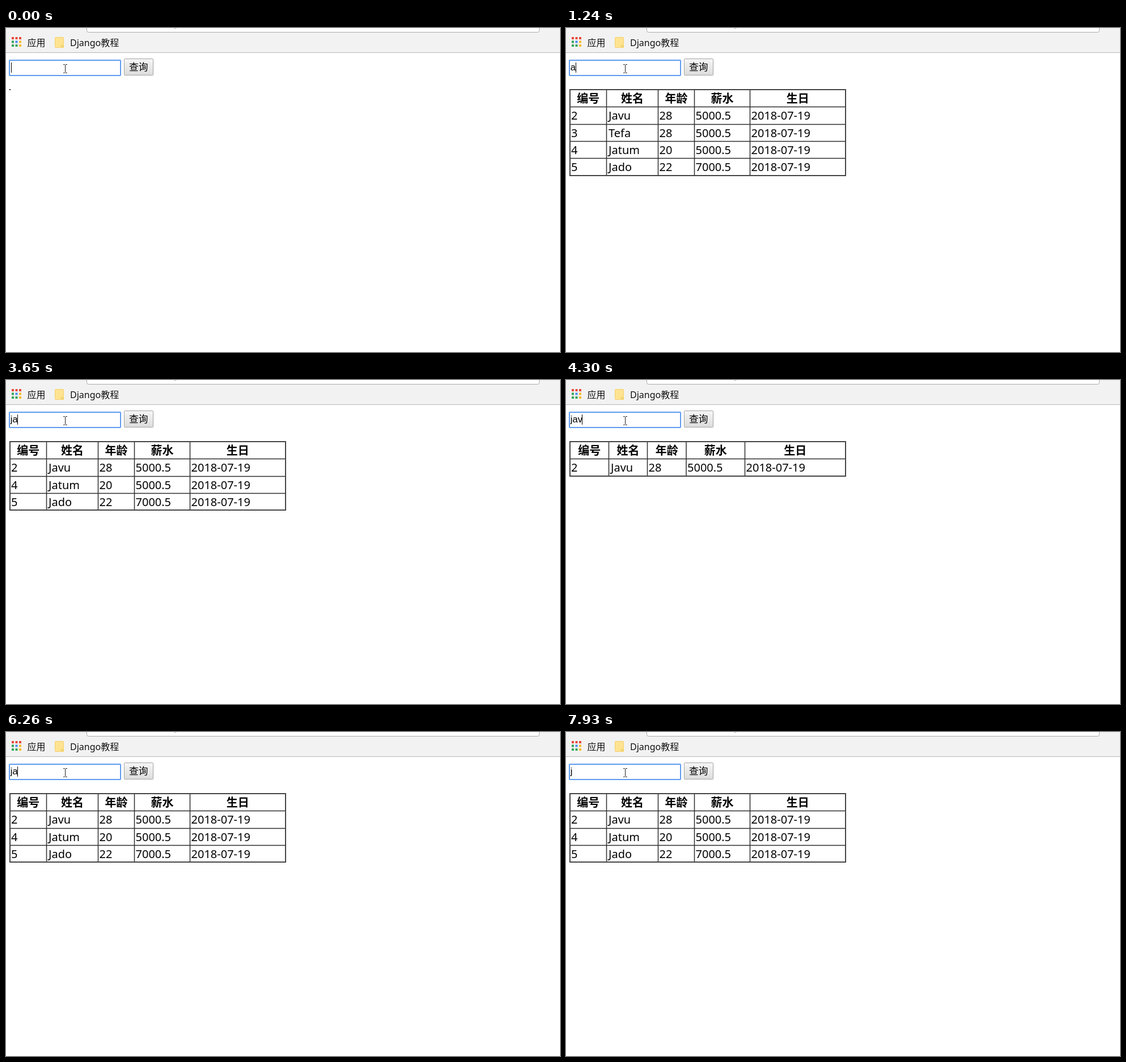
Animation, 977 px wide and 573 px high, one loop 8 s. Source, as an HTML page:

```html
<!DOCTYPE html>
<html lang="zh-CN">
<head>
<meta charset="utf-8">
<title>Django教程</title>
<style>
html, body { margin: 0; width: 100%; height: 100%; overflow: hidden; background: #fff; }
svg { display: block; width: 977px; height: 573px; }
text { font-family: "Noto Sans", "Noto Sans CJK SC", "Noto Sans CJK", sans-serif; fill: #000; white-space: pre; }
.bar { font-size: 16px; fill: #111; }
.btn { font-size: 16.67px; }
.typed { font: 16.67px "Liberation Sans", Arial, sans-serif; }
.cell { font-size: 20px; }
.head { font-size: 20px; font-weight: 700; text-anchor: middle; }
</style>
</head>
<body>
<svg viewBox="0 0 977 573">
  <defs>
    <linearGradient id="face" x2="0" y2="1">
      <stop stop-color="#f6f6f6"/><stop offset="1" stop-color="#dcdcdc"/>
    </linearGradient>
  </defs>

  <!-- browser bar -->
  <rect width="977" height="43" fill="#f2f2f2"/>
  <rect y="43" width="977" height="1" fill="#b6b6b6"/>
  <rect x="142.5" y="-20" width="798" height="27.5" rx="3" fill="#fff" stroke="#a9a9a9"/>
  <path d="M296.500 0h4" stroke="#777"/>
  <g id="apps"></g>
  <text class="bar" x="37.500" y="32">应用</text>
  <path d="M87.500 16.500h13q1 0 1 1v12.500l-3 4.500h-11q-1 0-1-1v-16q0-1 1-1z" fill="#fee391" stroke="#f3d06c"/>
  <path d="M97 35v-5h5v4q0 1-1 1z" fill="#f5d36b"/>
  <text class="bar" x="113" y="32">Django教程</text>

  <!-- search form -->
  <rect x="6" y="57" width="196" height="27" rx="1" fill="#fff" stroke="#5e9bee" stroke-width="2"/>
  <text class="typed" id="typed" x="7.700" y="75"></text>
  <rect id="caret" y="61" width="1" height="18"/>
  <path d="M101 64.500h2.500l1 1 1-1h2.500M104.500 65v13.500M101 79.500h2.500l1-1 1 1h2.500" fill="none" stroke="#222"/>
  <rect x="208.500" y="54.500" width="51" height="29" rx="1" fill="url(#face)" stroke="#a3a3a3"/>
  <text class="btn" x="217" y="75">查询</text>

  <rect id="dot" x="6" y="108" width="2" height="2" fill="#222"/>
  <g id="grid"></g>
</svg>

<script>
const $ = id => document.getElementById(id);
const LOOP = 8000, TOP = 109, PITCH = 30.3;
const heads = ['编号', '姓名', '年龄', '薪水', '生日'];
const people = [
  [2, 'Javu', 28, '5000.5'],
  [3, 'Tefa', 28, '5000.5'],
  [4, 'Jatum', 20, '5000.5'],
  [5, 'Jado', 22, '7000.5']
].map(p => [...p, '2018-07-19']);
const wide = [7, 71.5, 162.5, 226.5, 324.5, 493];
const narrow = [7, 75.5, 143.5, 212, 315.5, 493];
const caretX = { '': 9, a: 17, j: 12, ja: 20, jav: 28 };

// time, typed text, caret shown, query whose result is on the page
const steps = [
  [0, '', 1, ''], [250, '', 0, ''], [810, '', 1, ''],
  [1090, 'a', 1, ''], [1240, 'a', 1, 'a'], [1670, 'a', 0, 'a'], [2230, 'a', 1, 'a'],
  [2350, '', 1, 'a'], [2470, '', 1, ''], [2930, '', 0, ''], [3360, '', 1, ''],
  [3510, 'j', 1, ''], [3650, 'ja', 1, 'ja'],
  [4180, 'jav', 1, 'ja'], [4300, 'jav', 1, 'jav'], [4690, 'jav', 0, 'jav'], [5250, 'jav', 1, 'jav'],
  [5400, 'ja', 1, 'jav'], [5550, 'ja', 1, 'ja'], [5700, 'ja', 0, 'ja'],
  [6260, 'ja', 1, 'ja'], [6850, 'ja', 0, 'ja'], [7380, 'ja', 1, 'ja'],
  [7660, '', 1, ''], [7810, 'j', 0, ''], [7930, 'j', 0, 'j']
];

const label = (cls, x, y, s) => `<text class="${cls}" x="${x}" y="${y}">${s}</text>`;

function table(query) {
  if (!query) return '';
  const rows = people.filter(p => p[1].toLowerCase().includes(query));
  const cols = rows.length > 1 ? wide : narrow;
  const lineY = i => Math.round(TOP + PITCH * i);
  const bottom = lineY(rows.length + 1);
  let lines = '', out = '';
  cols.slice(1, -1).forEach(x => lines += `M${x} ${TOP}V${bottom}`);
  heads.forEach((h, c) => out += label('head', (cols[c] + cols[c + 1]) / 2, 132, h));
  rows.forEach((row, r) => {
    lines += `M7 ${lineY(r + 1) + 0.5}H493`;
    row.forEach((v, c) => out += label('cell', cols[c] + (c === 1 ? 3.5 : 2), lineY(r + 1) + 23, v));
  });
  return `<path d="${lines}" fill="none" stroke="#2e2e2e" stroke-width="1.5"/>` +
    `<rect x="7" y="${TOP}" width="486" height="${bottom - TOP}" fill="none" stroke="#444" stroke-width="2"/>` + out;
}

const [red, green, blue, yellow] = ['#e8483b', '#35a35a', '#4a8af0', '#f5bb2b'];
$('apps').innerHTML = [red, red, red, green, blue, yellow, green, green, yellow]
  .map((c, i) => `<rect x="${10 + i % 3 * 6.5}" y="${16 + Math.floor(i / 3) * 6.5}" width="4" height="4" fill="${c}"/>`)
  .join('');

let shown;
function draw() {
  const t = performance.now() % LOOP;
  const step = steps.findLast(s => s[0] <= t);
  if (step !== shown) {
    const [, text, caret, query] = shown = step;
    $('typed').textContent = text;
    $('caret').setAttribute('x', caretX[text]);
    $('caret').style.opacity = caret;
    $('dot').style.opacity = query ? 0 : 1;
    $('grid').innerHTML = table(query);
  }
  requestAnimationFrame(draw);
}
draw();
</script>
</body>
</html>
```
